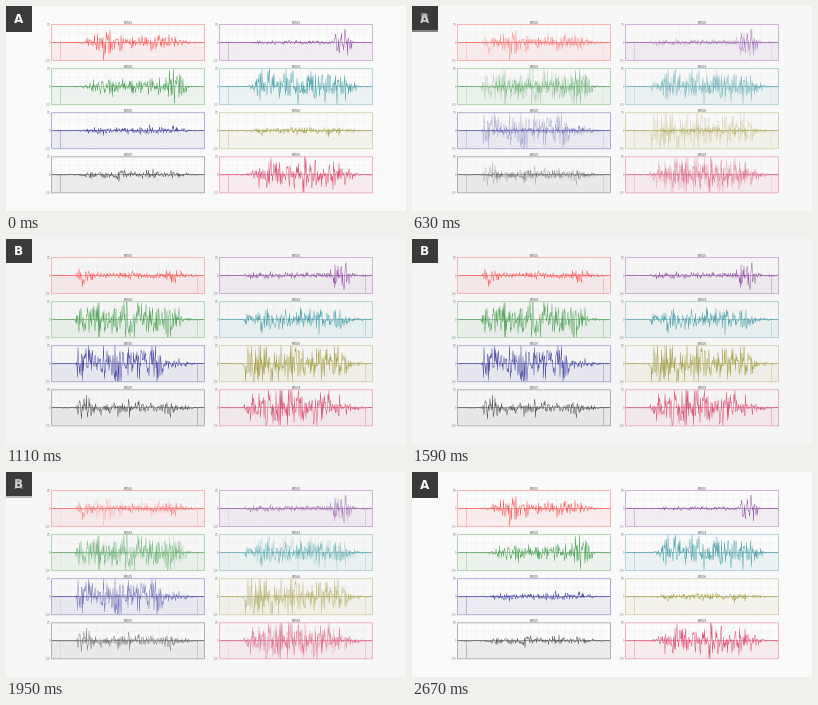
Animation of 400 by 205 pixels, one loop 2.7 s. Source, as a matplotlib script:

```python
import numpy as np
import matplotlib.pyplot as plt
from matplotlib.animation import FuncAnimation
from matplotlib.colors import to_rgb
from matplotlib.patches import Rectangle

W, H, DPI = 400, 205, 80
PT = 72 / DPI
FRAMES, STEP = 90, 30
PANEL_W, HALF = 153, 18

COLORS = ("#ff4545", "#8a3f9c", "#3f9a48", "#3d9aa5",
          "#34349c", "#a09a3c", "#3c3c3c", "#d83c66")
BACK_A, BACK_B = np.array(to_rgb("#fafafa")), np.array(to_rgb("#f5f5f5"))

# Strength of each panel's steady activity, in pixels.
BODY_A = (6, 1.5, 7, 15, 3.3, 3.3, 3.3, 15)
BODY_B = (3, 2.5, 16, 9, 18, 18, 6, 19)
# Extra bursts: early ones by panel as (centre, level), late ones for all.
BURST_A = {0: (54, 15), 1: (123, 13), 2: (126, 15)}
ONSET_B = {0: 7, 6: 6}
LATE_B = (6, 15, 15, 12, 4, 16, 8, 12)

rng = np.random.default_rng(12)
x = np.arange(0, PANEL_W + .1, .5)


def window(start, end, soft):
    rise = 1 / (1 + np.exp((start - x) / soft))
    fall = 1 / (1 + np.exp((x - end) / (soft + 1)))
    return rise * fall


def bump(centre, width):
    return np.exp(-((x - centre) / width) ** 4)


def envelope_a(i):
    env = BODY_A[i] * window(35, 130, 3)
    if i in BURST_A:
        centre, level = BURST_A[i]
        env += level * bump(centre, 8)
    return env


def envelope_b(i):
    env = BODY_B[i] * window(25, 112, .5) + LATE_B[i] * bump(121, 9)
    env += ONSET_B.get(i, 0) * bump(34, 7)
    return env + 2 * window(128, 142, 2)


def noise(env):
    """Random trace with the given strength, uneven from burst to burst."""
    swell = np.interp(x, np.arange(0, PANEL_W + 5, 4),
                      rng.uniform(.7, 1.3, PANEL_W // 4 + 2))
    y = (env * swell + .4) * rng.normal(0, .5, x.size)
    return np.clip(y, -HALF, HALF)


def tint(color, share):
    return share * np.array(to_rgb(color)) + (1 - share) * BACK_A


def label(tx, ty, text, size, color, ha):
    ax.text(tx, ty, text, fontsize=size * PT, family="DejaVu Sans",
            color=color, ha=ha, va="center_baseline")


def draw_panel(x0, y0, color, number):
    right, top, bottom = x0 + PANEL_W, y0 - HALF, y0 + HALF
    ax.add_patch(Rectangle((x0, y0), PANEL_W, HALF, lw=0, fc=color,
                           alpha=.075, snap=False))
    grid = dict(color="#ebebeb", lw=.35 * PT, zorder=1.5, snap=False)
    ax.vlines(np.linspace(x0, right, 18)[1:-1], top, bottom, **grid)
    ax.hlines(np.linspace(top, bottom, 5)[1:-1], x0, right, **grid)
    ax.add_patch(Rectangle((x0, top), PANEL_W, 2 * HALF, fill=False,
                           ec=tint(color, .42), lw=.9 * PT, zorder=4,
                           snap=False))
    label((x0 + right) / 2, top - 2.4, f"EMG0{number}", 2.6, "#555555", "center")
    for y, text in ((top, "0.5"), (y0, "0"), (bottom, "-0.5")):
        label(x0 - 1.2, y - .4, text, 2.5, "#777777", "right")


def draw_trace(x0, y0, color, env, marker):
    style = dict(color=color, zorder=3, snap=False)
    trace, = ax.plot(x0 + x, y0 - noise(env), lw=.42 * PT, **style)
    base, = ax.plot([x0, x0 + PANEL_W], [y0, y0], lw=.45 * PT, **style)
    edge, = ax.plot([x0 + marker] * 2, [y0, y0 + HALF], lw=.7 * PT,
                    color=tint(color, .45), zorder=2, snap=False)
    return [trace, base, edge]


def draw_letter(text, baseline):
    return ax.text(12.6, baseline, text, color="white", fontsize=12 * PT,
                   family="DejaVu Sans", weight="bold", ha="center")


fig = plt.figure(figsize=(W / DPI, H / DPI), dpi=DPI)
ax = fig.add_axes((0, 0, 1, 1))
ax.set_xlim(0, W)
ax.set_ylim(H, 0)
ax.axis("off")

# The badge is slightly taller in the first state.
ax.add_patch(Rectangle((0, 0), 26, 24, fc="#3b3a39", lw=0))
strip = ax.add_patch(Rectangle((0, 24), 26, 2, fc="#3b3a39", lw=0))

layer_a = [strip, draw_letter("A", 17.3)]
layer_b = [draw_letter("B", 16.4)]
for i, color in enumerate(COLORS):
    x0, y0 = 45.5 + 168 * (i % 2), 36.5 + 44.1 * (i // 2)
    draw_panel(x0, y0, color, i + 1)
    layer_a += draw_trace(x0, y0, color, envelope_a(i), 9)
    layer_b += draw_trace(x0, y0, color, envelope_b(i), 146)


def ease(t):
    return 8 * t ** 4 if t < .5 else 1 - 8 * (1 - t) ** 4


def update(frame):
    half = FRAMES // 2
    mix = ease(frame % half / half)
    if frame >= half:
        mix = 1 - mix
    fig.set_facecolor((1 - mix) * BACK_A + mix * BACK_B)
    for layer, alpha in ((layer_a, 1 - mix), (layer_b, mix)):
        for artist in layer:
            artist.set_alpha(alpha)
    return layer_a + layer_b


anim = FuncAnimation(fig, update, frames=FRAMES, interval=STEP,
                     repeat=True, repeat_delay=0, blit=False)
plt.show()
```
